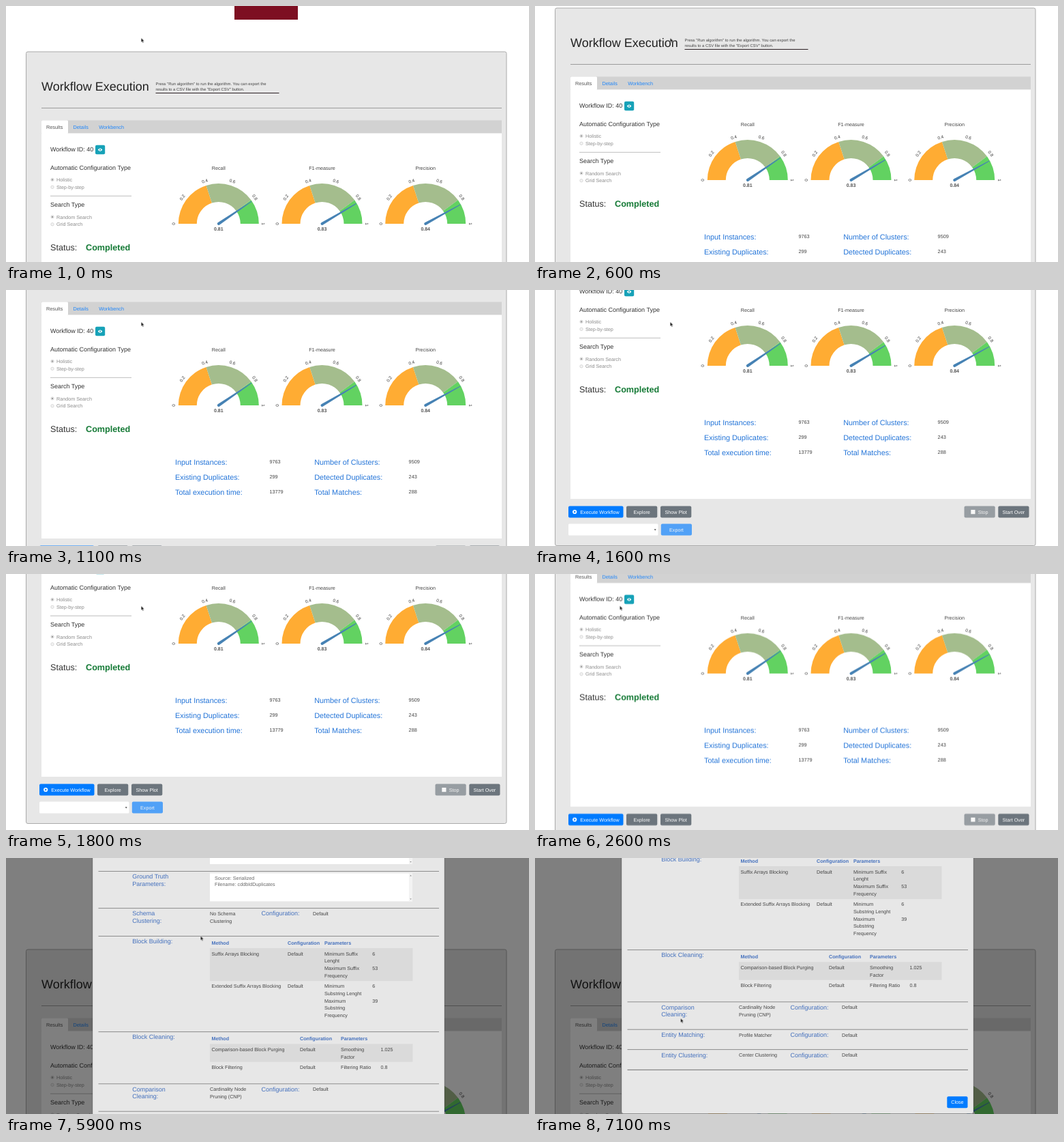
An HTML page that plays this animation: 767 by 375 pixels, repeating every 8 s.

```html
<!DOCTYPE html>
<html lang="en">
<head>
<meta charset="utf-8">
<title>Workflow Execution</title>
<style>
  html, body { margin: 0; width: 100%; height: 100%; overflow: hidden; background: #fff; }
  svg { display: block; width: 767px; height: 375px; font-family: "Liberation Sans", Arial, sans-serif; text-rendering: geometricPrecision; }
  text { white-space: pre; }
  #page, #dialog, #sheet, #cursor { animation: 8s step-end infinite; }
  #page { animation-name: scroll-page; }
  #dialog { animation-name: show; }
  #sheet { animation-name: scroll-sheet; }
  #cursor { animation-name: point; }

  /* 1.25% = 100 ms */
  @keyframes scroll-page {
    0% { transform: translateY(0); }
    3.75% { transform: translateY(-33px); }
    5% { transform: translateY(-43px); }
    7.5% { transform: translateY(-64px); }
    8.75% { transform: translateY(-83px); }
    10% { transform: translateY(-96px); }
    11.25% { transform: translateY(-118px); }
    12.5% { transform: translateY(-130px); }
    13.75% { transform: translateY(-150px); }
    15% { transform: translateY(-167px); }
    16.25% { transform: translateY(-172px); }
    18.75% { transform: translateY(-190px); }
    20% { transform: translateY(-208px); }
    21.25% { transform: translateY(-215px); }
    22.5% { transform: translateY(-217px); }
    28.75% { transform: translateY(-202px); }
    30% { transform: translateY(-184px); }
    31.25% { transform: translateY(-175px); }
    32.5% { transform: translateY(-173.3px); }
    61.25%, 100% { transform: translateY(67px); }
  }
  @keyframes show {
    0% { visibility: hidden; }
    61.25%, 100% { visibility: visible; }
  }
  @keyframes scroll-sheet {
    0% { transform: translateY(0); }
    68.75% { transform: translateY(-43px); }
    73.75% { transform: translateY(-49px); }
    77.5% { transform: translateY(-92px); }
    83.75% { transform: translateY(-135px); }
    88.75%, 100% { transform: translateY(-169px); }
  }
  @keyframes point {
    0% { transform: translate(198.3px, 46.8px); }
    28.75% { transform: translate(180px, 46.8px); }
    30% { transform: translate(155px, 46.8px); }
    31.25% { transform: translate(132px, 46.8px); }
    32.5% { transform: translate(124.4px, 46.5px); }
    61.25% { transform: translate(285.4px, 114.3px); }
    88.75%, 100% { transform: translate(213.6px, 234.8px); }
  }
</style>
</head>
<body>
<svg viewBox="0 0 767 375">
  <g id="page"></g>
  <g id="dialog">
    <rect width="767" height="375" opacity=".5"/>
    <g id="sheet"></g>
  </g>
  <path id="cursor" d="M0 0V6.2L1.4 5L2.4 7.2L3.4 6.7L2.5 4.6H4.4Z" fill="#111" stroke="#fff" stroke-width=".4"/>
</svg>
<script>
  const SMALL = 7.2, LABEL = 9;
  const BLUE = '#007bff', GRAY = '#6c757d', INK = '#444', LINK = '#4470bd';

  const text = (x, y, str, size = SMALL, fill = INK, extra = '') =>
    `<text x="${x}" y="${y}" font-size="${size}" fill="${fill}" ${extra}>${str}</text>`;
  const mid = 'text-anchor="middle"', bold = 'font-weight="bold"';
  const rect = (x, y, x2, y2, fill, extra = '') =>
    `<rect x="${x}" y="${y}" width="${x2 - x}" height="${y2 - y}" fill="${fill}" ${extra}/>`;
  const rule = (x, x2, y, color, w = 1) =>
    `<path d="M${x} ${y}H${x2}" stroke="${color}" stroke-width="${w}"/>`;
  const lines = (x, y, list, step, ...style) =>
    list.map((s, i) => text(x, y + i * step, s, ...style)).join('');
  const button = (x, x2, y, fill, label, cx = (x + x2) / 2, ink = '#fff') =>
    rect(x, y, x2, y + 17, fill, 'rx="2"') + text(cx, y + 11, label, SMALL, ink, mid);

  const polar = (cx, cy, r, v) => {
    const a = Math.PI * (1 - v);
    return [cx + r * Math.cos(a), cy - r * Math.sin(a)];
  };

  function band(cx, cy, from, to, fill) {
    const p = (r, v) => polar(cx, cy, r, v).join(' ');
    return `<path fill="${fill}" d="M${p(59, from)}A59 59 0 0 1 ${p(59, to)}L${p(32, to)}A32 32 0 0 0 ${p(32, from)}Z"/>`;
  }

  function gauge(cx, title, value) {
    const cy = 319;
    let out = text(cx, 239.5, title, SMALL, INK, mid)
      + band(cx, cy, 0, .4, '#ffac33')
      + band(cx, cy, .4, .8, '#a4bd8d')
      + band(cx, cy, .8, 1, '#62d261');
    for (let i = 0; i <= 5; i++) {
      const [x, y] = polar(cx, cy, 63.6, i / 5);
      out += text(x, y, i % 5 ? '0.' + i * 2 : i / 5, 6.3, '#333',
        `${mid} transform="rotate(${i * 36 - 90} ${x} ${y})"`);
    }
    out += `<path fill="#4682b4" transform="rotate(${180 * value - 180} ${cx} ${cy})"
      d="M${cx} ${cy - 2}L${cx + 58.5} ${cy - .5}V${cy + .5}L${cx} ${cy + 2}A2 2 0 0 1 ${cx} ${cy - 2}Z"/>`;
    return out + text(cx, 329, value, 7, '#555', mid + bold.padStart(20));
  }

  const radio = (y, label, on) =>
    `<circle cx="68" cy="${y}" r="2.2" fill="#f4f4f4" stroke="#c4c4c4" stroke-width=".6"/>`
    + (on ? `<circle cx="68" cy="${y}" r="1.2" fill="#999"/>` : '')
    + text(74, y + 2.6, label, SMALL, '#8a8a8a');

  const stat = (x, row, label, value) =>
    text(x, 406.4 + row * 21.8, label, 10.85, '#2374d8')
    + text(x + 138.4, 404.2 + row * 21.8, value, 7.3);

  document.getElementById('page').innerHTML = [
    rect(335, -73, 428, 20, '#7d0f22'),
    rect(29.5, 67, 734, 582.5, '#e7e7e7', 'rx="2.5" stroke="#aaa"'),
    text(52, 124.3, 'Workflow Execution', 18, '#222'),
    lines(219.5, 115.6, ['Press "Run algorithm" to run the algorithm. You can export the',
      'results to a CSV file with the "Export CSV" button.'], 8.6, 5.9),
    rule(219.5, 400.5, 127.5, '#2b2024', 1.2),
    rule(52, 727, 149.5, '#9c9c9c'),
    rect(52, 167.5, 727, 186.5, '#d2d2d2'),
    rect(52, 186.5, 727, 514, '#fff'),
    rect(52, 167.5, 91, 187, '#fff', 'rx="1.5"'),
    text(59, 179.6, 'Results', 7.3, '#555'),
    text(98.5, 179.6, 'Details', 7.3, '#1f86fa'),
    text(136.3, 179.6, 'Workbench', 7.3, '#1f86fa'),

    text(65, 212.5, 'Workflow ID: 40', LABEL, '#333'),
    rect(131, 203.8, 145.2, 217.2, '#17a2b8', 'rx="2"'),
    '<path d="M134.8 210.6Q138.1 206.2 141.4 210.6Q138.1 215 134.8 210.6Z" fill="#fff"/>',
    '<circle cx="138.1" cy="210.6" r="1.1" fill="#17a2b8"/>',
    text(65, 239.6, 'Automatic Configuration Type', LABEL, '#333'),
    radio(254.4, 'Holistic', true),
    radio(265.3, 'Step-by-step'),
    rule(65, 184, 278.3, '#bdbdbd'),
    text(65, 294, 'Search Type', LABEL, '#333'),
    radio(308.9, 'Random Search', true),
    radio(319.8, 'Grid Search'),
    text(65, 357.6, 'Status:', 12.6, '#333'),
    text(117, 357.6, 'Completed', 12.65, '#157a36', bold),

    gauge(311.8, 'Recall', .81),
    gauge(463.5, 'F1-measure', .83),
    gauge(615.2, 'Precision', .84),

    stat(248, 0, 'Input Instances:', 9763),
    stat(248, 1, 'Existing Duplicates:', 299),
    stat(248, 2, 'Total execution time:', 13779),
    stat(452.2, 0, 'Number of Clusters:', 9509),
    stat(452.2, 1, 'Detected Duplicates:', 243),
    stat(452.2, 2, 'Total Matches:', 288),

    button(49, 129.5, 524.5, BLUE, 'Execute Workflow', 95),
    '<circle cx="58.2" cy="533" r="3.1" fill="#fff"/>',
    `<path d="M57.2 531.3V534.7L60.1 533Z" fill="${BLUE}"/>`,
    button(134, 179.3, 524.5, GRAY, 'Explore'),
    button(184, 229.3, 524.5, GRAY, 'Show Plot'),
    button(629.5, 674.7, 524.5, '#979da2', 'Stop', 657.2, '#f4f4f4'),
    rect(639.3, 530, 645.5, 536.2, '#f7f7f7'),
    button(679.3, 724.5, 524.5, GRAY, 'Start Over'),
    rect(49, 550.5, 180.5, 567.5, '#fff', 'rx="1.5"'),
    '<path d="M174.8 558.2H177.6L176.2 560.4Z" fill="#444"/>',
    button(184.8, 230, 550.5, '#51a1f7', 'Export', undefined, '#f4f4f4')
  ].join('');

  const label = (y, ...list) => lines(185.3, y, list, 10.8, LABEL, LINK);
  const value = (y, ...list) => lines(299, y, list, 10.8);
  const config = y => text(374.5, y + .4, 'Configuration:', LABEL, LINK) + text(450, y, 'Default');

  const area = (y, file) =>
    rect(299, y, 596, y + 41, '#fff')
    + rect(591, y, 596, y + 41, '#f3f3f3')
    + `<path d="M592.2 ${y + 4}H594.8L593.5 ${y + 2.4}ZM592.2 ${y + 37}H594.8L593.5 ${y + 38.6}Z" fill="#888"/>`
    + lines(306, y + 9.2, ['Source: Serialized', 'Filename: ' + file], 9.2, SMALL, '#666');

  // cols: x of method, configuration, parameter name, parameter value
  const head = (y, cols) => ['Method', 'Configuration', 'Parameters']
    .map((s, i) => text(cols[i], y, s, SMALL, LINK, bold)).join('');
  const row = (y, cols, method, names, values) =>
    text(cols[0], y, method) + text(cols[1], y, 'Default')
    + lines(cols[2], y, names, 10.75) + lines(cols[3], y, values, 10.75);
  const build = [301.5, 413, 467, 537.3], clean = [301.5, 431, 491, 549.5];

  document.getElementById('sheet').innerHTML = [
    rect(127, -200, 643, 543.5, '#e7e7e7', 'rx="3" stroke="#000" stroke-opacity=".2"'),
    [14, 68.5, 122.6, 163.5, 303.6, 379.8, 420.2, 449.6].map(y => rule(135.5, 635, y, '#8c8c8c')).join(''),
    rule(135.5, 635, 479.3, '#707070'),
    value(2, 'Resolution'),
    label(24.2, 'Dataset 1', 'Parameters:'),
    area(17, 'cddbProfiles'),
    label(79, 'Ground Truth', 'Parameters:'),
    area(71.4, 'cddbIdDuplicates'),
    label(133.4, 'Schema', 'Clustering:'),
    value(133, 'No Schema', 'Clustering'), config(133),

    label(173.8, 'Block Building:'),
    rect(299, 181, 596.5, 229.3, '#dadada'),
    head(176, build),
    row(191.5, build, 'Suffix Arrays Blocking',
      ['Minimum Suffix', 'Lenght', 'Maximum Suffix', 'Frequency'], [6, '', 53]),
    row(239, build, 'Extended Suffix Arrays Blocking',
      ['Minimum', 'Substring Lenght', 'Maximum', 'Substring', 'Frequency'], [6, '', 39]),

    label(314.2, 'Block Cleaning:'),
    rect(299, 321.3, 596.5, 347.6, '#dadada'),
    head(316.4, clean),
    row(332, clean, 'Comparison-based Block Purging', ['Smoothing', 'Factor'], ['1.025']),
    row(358, clean, 'Block Filtering', ['Filtering Ratio'], ['0.8']),

    label(390.6, 'Comparison', 'Cleaning:'),
    value(390.2, 'Cardinality Node', 'Pruning (CNP)'), config(390.2),
    label(431, 'Entity Matching:'),
    value(430.6, 'Profile Matcher'), config(430.6),
    label(460.6, 'Entity Clustering:'),
    value(460.2, 'Center Clustering'), config(460.2),
    button(604.3, 634.5, 518.2, BLUE, 'Close')
  ].join('');
</script>
</body>
</html>
```
